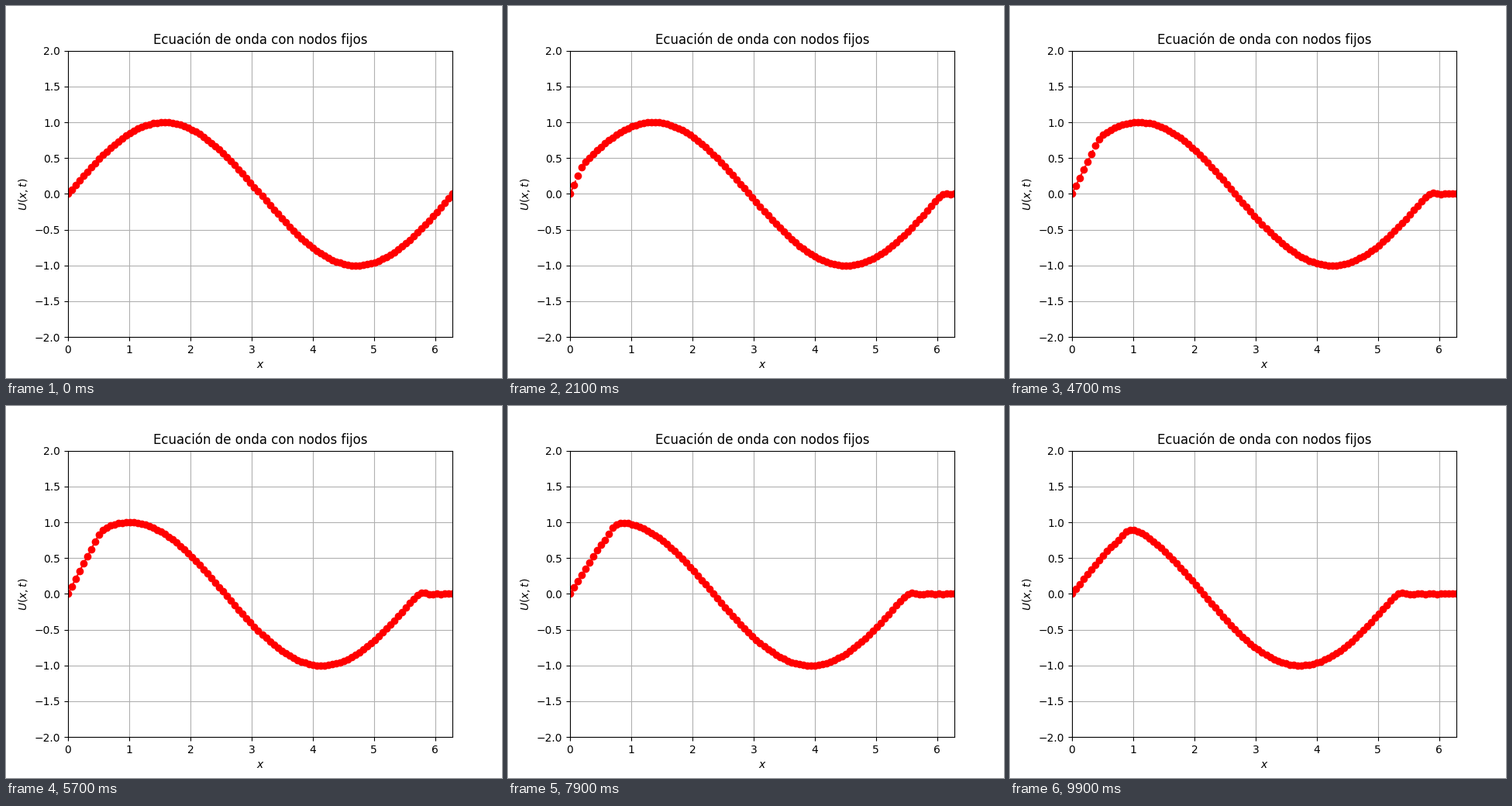
Animation of 640 by 480 pixels, one loop 10000 ms. Source, as a matplotlib script:

```python
import numpy as np
import matplotlib.pyplot as plt
from matplotlib.animation import FuncAnimation

NODES, STEPS = 100, 100
DT, SPEED = 0.01, 1.0

x = np.linspace(0, 2 * np.pi, NODES)
courant2 = (SPEED * DT / (x[1] - x[0])) ** 2


def bend(u):
    """Scaled second difference, zero at the fixed ends."""
    d = np.zeros_like(u)
    d[1:-1] = courant2 * (u[2:] - 2 * u[1:-1] + u[:-2])
    return d


def solve():
    """Explicit wave equation: u = sin x, u_t = cos x, both ends held at 0."""
    u = np.zeros((STEPS, NODES))
    u[0] = np.sin(x)
    u[1] = u[0] + DT * np.cos(x) + bend(u[0]) / 2
    u[:, [0, -1]] = 0
    for n in range(1, STEPS - 1):
        u[n + 1] = 2 * u[n] - u[n - 1] + bend(u[n])
    return u


wave = solve()

fig, ax = plt.subplots(figsize=(6.4, 4.8), dpi=100)
ax.set_xlim(0, 2 * np.pi)
ax.set_ylim(-2, 2)
ax.set_title("Ecuación de onda con nodos fijos")
ax.set_xlabel("$x$")
ax.set_ylabel("$U(x,t)$")
ax.grid(True)
line, = ax.plot(x, wave[0], "ro--")


def update(n):
    line.set_ydata(wave[n])
    return line,


anim = FuncAnimation(fig, update, frames=STEPS, interval=100,
                     repeat=True, repeat_delay=0)
plt.show()
```
